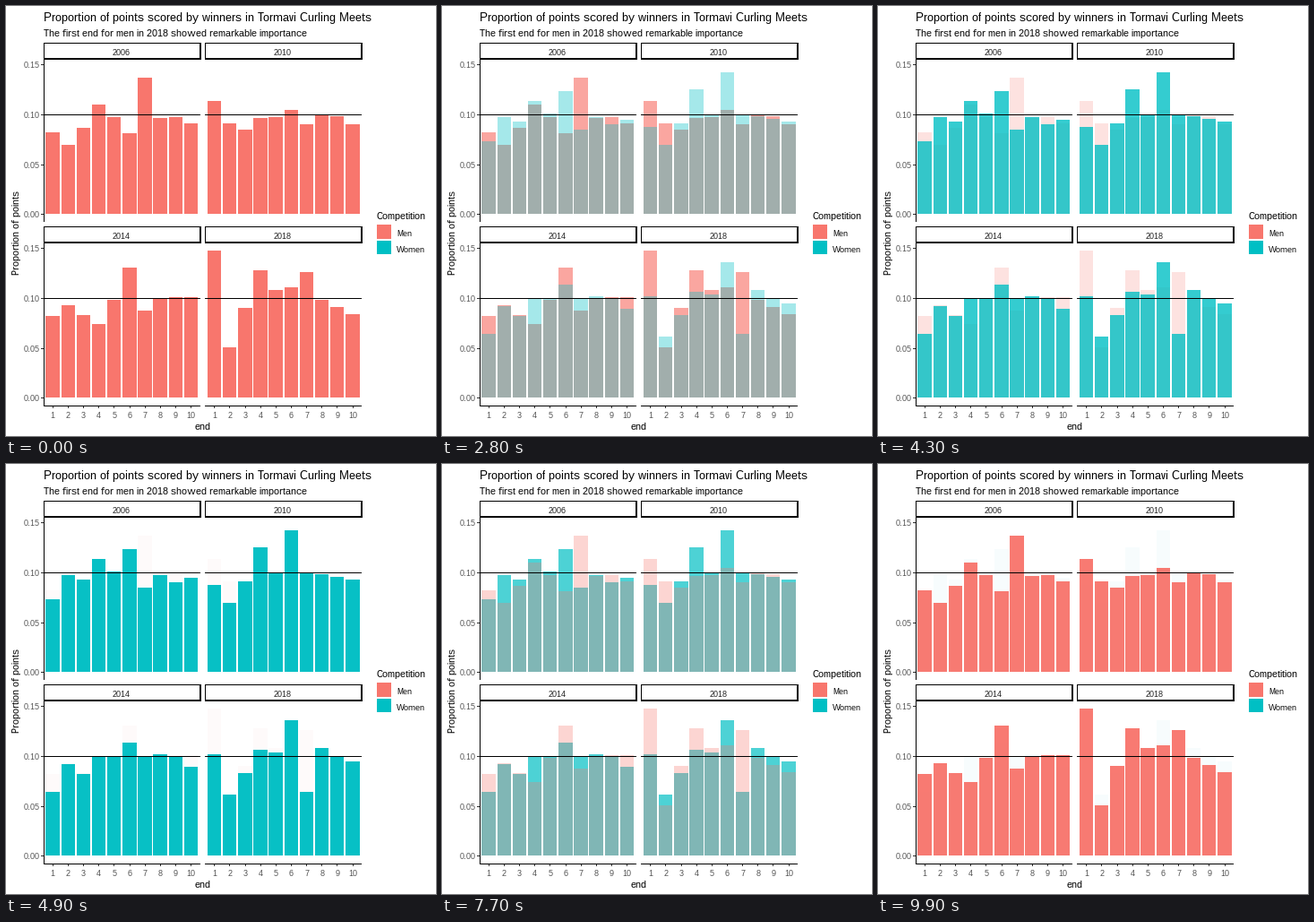
Recreate the animation shown at these times as a matplotlib script. Size 480 by 480 pixels, loop 10000 ms.

```python
import matplotlib.pyplot as plt
import numpy as np
from matplotlib.animation import FuncAnimation
from matplotlib.collections import PolyCollection
from matplotlib.patches import Rectangle

SIZE, DPI = 480, 100
MEN, WOMEN = "#F8766D", "#00BFC4"
PX_PER_MILLE = 1.115
STEP = 17.16          # distance between neighbouring ends
BAR = 0.9 * STEP

# Shares are in thousandths. Five ends set each group's shape;
# the others stay close to one common curve.
ENDS = np.arange(1, 11)
KEY_ENDS = np.array([1, 2, 4, 6, 7])
KEY_SHARES = {
    2006: ([82, 69, 109.5, 81, 137], [73, 97, 113, 123, 85]),
    2010: ([113, 91, 96, 104, 90], [87, 69, 125, 142, 100]),
    2014: ([82, 93, 74, 130, 87], [64, 92, 100, 113, 100]),
    2018: ([147, 51, 128, 111, 126], [102, 61, 106, 136, 64]),
}
COMMON = np.interp(ENDS, [3, 5, 8, 10], [88, 98, 102, 93])
rng = np.random.default_rng(2018)

plt.rcParams.update({"font.family": "Liberation Sans",
                     "text.hinting": "native", "text.hinting_factor": 1})
fig = plt.figure(figsize=(SIZE / DPI, SIZE / DPI), dpi=DPI, facecolor="white")
ax = fig.add_axes([0, 0, 1, 1])
ax.set(xlim=(0, SIZE), ylim=(SIZE, 0))
ax.axis("off")


def box(x0, y0, x1, y1, color="black"):
    ax.add_patch(Rectangle((x0, y0), x1 - x0, y1 - y0, facecolor=color,
                           linewidth=0, antialiased=False, zorder=5))


def label(x, y, text, px, color="black", ha="left", **kw):
    ax.text(x, y, text, fontsize=px * 72 / DPI, color=color, ha=ha,
            va="baseline", zorder=6, **kw)


def row(zero, share):
    return int(np.floor(zero + 0.9 - PX_PER_MILLE * share))


def shares(key_shares):
    values = COMMON + rng.normal(0, 4, len(ENDS))
    values[KEY_ENDS - 1] = key_shares
    return values


def bars(left, zero, values):
    quads = []
    for i, share in enumerate(values):
        start = left + 2.36 + i * STEP
        x0, x1, y0 = round(start), round(start + BAR), row(zero, share)
        quads.append([(x0, zero), (x0, y0), (x1, y0), (x1, zero)])
    return quads


def strip(left, top, year):
    box(left, top, left + 176, top + 19)
    box(left + 1, top + 1, left + 174, top + 17, "white")
    label(left + 87, top + 14, year, 9, "#1A1A1A", "center")


def y_axis(left, top, zero):
    box(left, top, left + 1, top + 181)
    for share in range(0, 151, 50):
        y = row(zero, share)
        box(left - 3, y, left, y + 1, "#333333")
        label(left - 4.5, y + 4, f"{share / 1000:.2f}", 9, "#4D4D4D", "right")


def x_axis(left, exact_left):
    box(left, 446, left + 175, 447)
    for end in ENDS:
        x = exact_left + (end - 0.4) * STEP
        box(int(x), 447, int(x) + 1, 449, "#333333")
        label(x, 460, end, 9, "#4D4D4D", "center")


men_quads, women_quads = [], []
for n, (year, (men, women)) in enumerate(KEY_SHARES.items()):
    r, c = divmod(n, 2)
    left, top = 42 + 180 * c, 41 + 205 * r
    exact_left, zero = 42 + 180.4 * c, 232 + 205 * r
    men_quads += bars(exact_left, zero, shares(men))
    women_quads += bars(exact_left, zero, shares(women))
    strip(left, top, year)
    mark = row(zero, 100)
    box(left, mark, left + 175, mark + 1)
    if c == 0:
        y_axis(left, top + 19, zero)
    if r == 1:
        x_axis(left, exact_left)

label(42, 17, "Proportion of points scored by winners in Tormavi Curling Meets", 13)
label(42, 34, "The first end for men in 2018 showed remarkable importance", 11)
label(220, 473, "end", 11, ha="center")
label(15.5, 253.5, "Proportion of points", 11, ha="center",
      rotation=90, rotation_mode="anchor")

label(414, 238, "Competition", 11)
box(414, 244, 430, 260, MEN)
box(414, 262, 430, 277, WOMEN)
label(436, 257, "Men", 9)
label(436, 275, "Women", 9)


def layer(quads, color):
    return ax.add_collection(PolyCollection(
        quads, facecolors=color, linewidths=0, antialiaseds=False), autolim=False)


men_bars = layer(men_quads, MEN)
women_bars = layer(women_quads, WOMEN)


def update(k):
    # linear cross-fade; the group fading in lies on top
    w = float(np.interp(k, [16, 50, 67, 100], [0, 1, 1, 0]))
    women_bars.set_alpha(w)
    men_bars.set_alpha(1 - w)
    men_bars.set_zorder(2)
    women_bars.set_zorder(3 if k < 58 else 1)
    return men_bars, women_bars


anim = FuncAnimation(fig, update, frames=100, interval=100,
                     repeat=True, repeat_delay=0, blit=False)
plt.show()
```
